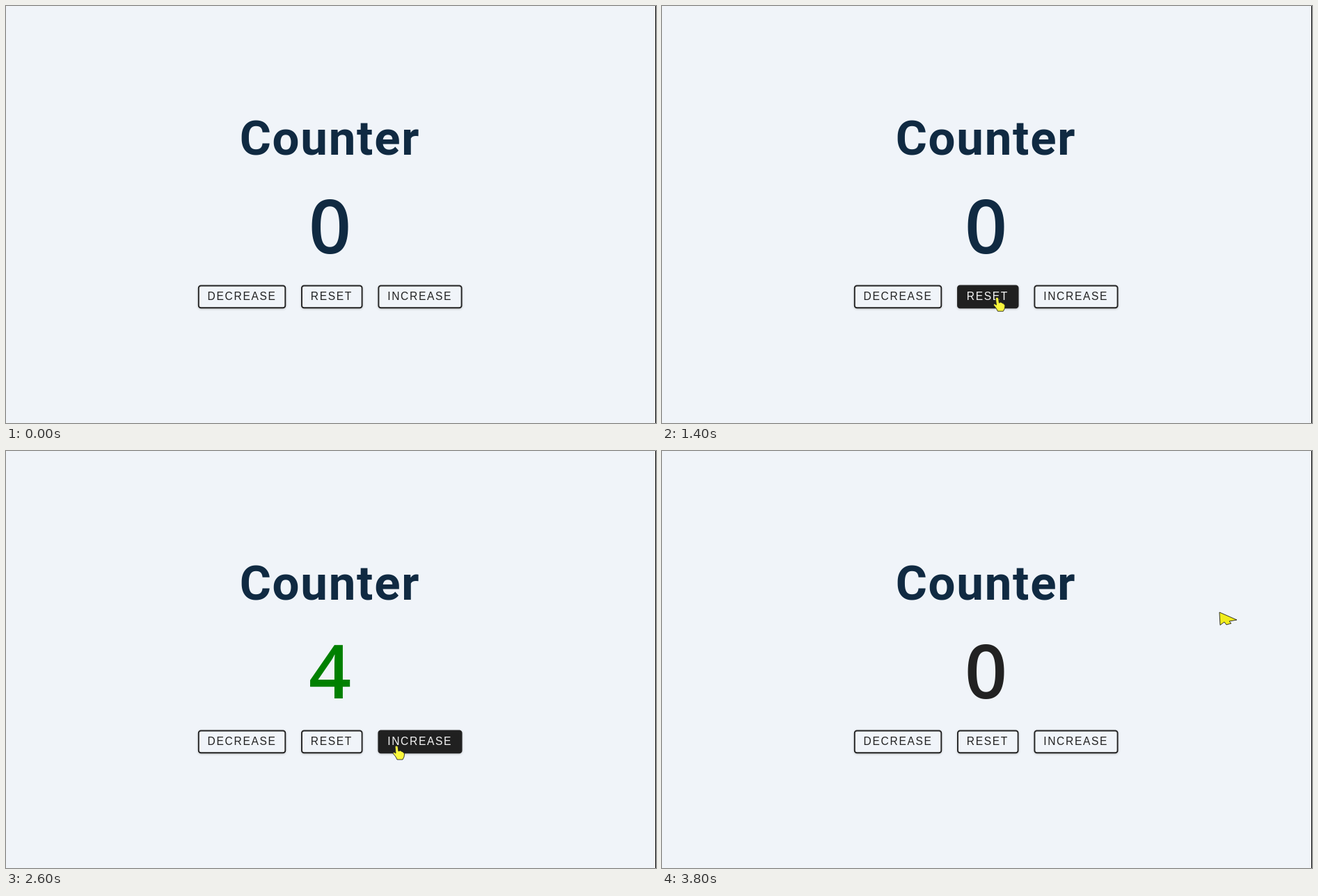
An HTML page that plays this animation: 934 by 600 pixels, repeating every 3900 ms.

```html
<!DOCTYPE html>
<html lang="en">
<head>
<meta charset="utf-8">
<title>Counter</title>
<style>
  html, body { margin: 0; width: 100%; height: 100%; overflow: hidden; background: #f0f4f9; }
  svg { display: block; width: 934px; height: 600px; }
  .title { font: 700 69px Roboto, sans-serif; letter-spacing: 1.73px; fill: #102a42; }
  .value { font: 600 107px "Open Sans", sans-serif; }
  .btn rect { stroke: #222; stroke-width: 1.9; filter: drop-shadow(0 1px 1.5px rgba(0, 0, 0, .2)); }
  .btn text { font: 15.6px "Liberation Sans", Arial, sans-serif; letter-spacing: 1.65px; }
  .cursor path { stroke: #222; stroke-width: .9; stroke-linejoin: round; }
</style>
</head>
<body>
<svg viewBox="0 0 934 600">
  <rect width="934" height="600" fill="#f0f4f9"/>
  <text class="title" x="465.4" y="214" text-anchor="middle">Counter</text>
  <text class="value" x="465.6" y="356" text-anchor="middle"></text>
  <g id="buttons"></g>
  <rect x="933" width="1" height="600" fill="#000"/>
  <g class="cursor"><path/></g>
</svg>
<script>
const LOOP = 3900, STEP = 100;
const ENTER = 300, RESET = 3400, LEAVE = 3700;
const TOP = 401.5, HEIGHT = 33.8;
const EDGE = 8; // the hover reacts a little inside the border

const shapes = {
  hand: ['M-2 1Q0-1 2 1L3 8L5 7Q7 7 7.5 8.5Q9.5 8 10 10Q11.5 10 11.5 12L11 16L9 20H1L-1 16L-5 11Q-5 9-3 9.5L-1 11Z', '#fbf83c'],
  arrow: ['M0 0V14L3.5 11L6 17L8.5 16L6 10.5H11Z', '#ffee58'],
  swept: ['M0 0L25 11L14 13L17 16L10 18L7 14L1 18.5Z', '#f0ec1c']
};

// the pointer rests between moves
const home = { x: 630, y: 413 };
const moves = [
  { from: ENTER, to: 1000, x: 362, y: 412 },
  { from: 1100, to: 1600, x: 561, y: 424 },
  { from: 2700, to: 2800, x: 345, y: 424 },
  { from: 3000, to: 3100, x: 431, y: 426 },
  { from: 3100, to: 3300, x: 446, y: 416 },
  { from: RESET, to: 3800, x: 801, y: 232 }
];

const NS = 'http://www.w3.org/2000/svg';
const $ = s => document.querySelector(s);
const clamp = (v, lo, hi) => Math.min(hi, Math.max(lo, v));
const lerp = (a, b, k) => a + (b - a) * k;
const mix = (a, b, k) => `rgb(${a.map((v, i) => Math.round(lerp(v, b[i], k)))})`;
const value = $('.value'), cursor = $('.cursor'), outline = $('.cursor path');

function add(parent, tag, attrs) {
  const el = document.createElementNS(NS, tag);
  for (const k in attrs) el.setAttribute(k, attrs[k]);
  return parent.appendChild(el);
}

function makeButton(label, x, w) {
  const g = add($('#buttons'), 'g', { class: 'btn' });
  const box = add(g, 'rect', { x: x + 1, y: TOP + 1, width: w - 2, height: HEIGHT - 2, rx: 3.3 });
  const text = add(g, 'text', { x: x + 13.8, y: 423 });
  text.textContent = label;
  return { x, w, box, text };
}

const buttons = [
  makeButton('DECREASE', 275.8, 126.5),
  makeButton('RESET', 424, 88.6),
  makeButton('INCREASE', 534.4, 121.2)
];

function pointer(t) {
  if (t < ENTER) return null;
  return moves.reduce((p, m) => {
    const k = clamp((t - m.from) / (m.to - m.from), 0, 1);
    return { x: lerp(p.x, m.x, k), y: lerp(p.y, m.y, k) };
  }, home);
}

// steady clicks up, then quick clicks down until the reset
function count(t) {
  if (t >= RESET) return 0;
  const up = clamp(Math.floor((t - 1680) / 220), 0, 4);
  const down = clamp(Math.ceil((t - 2700) / 40), 0, 10);
  return up - down;
}

function countColor(n, t) {
  if (n) return n > 0 ? '#008000' : '#ff0000';
  return t < RESET ? '#102a42' : '#222';
}

function over(b, t) {
  const p = pointer(t);
  return !!p && Math.abs(p.x - b.x - b.w / 2) < b.w / 2 - EDGE && p.y > TOP && p.y < TOP + HEIGHT;
}

function hover(b, t) {
  const before = over(b, t - STEP);
  return over(b, t) ? (before ? 1 : 0.5) : (before ? 0.95 : 0);
}

function draw(time) {
  const t = Math.floor((time % LOOP) / STEP) * STEP;

  const n = count(t);
  value.textContent = n;
  value.setAttribute('fill', countColor(n, t));

  for (const b of buttons) {
    const k = hover(b, t);
    b.box.setAttribute('fill', mix([240, 244, 249], [32, 32, 32], k));
    b.text.setAttribute('fill', mix([34, 34, 34], [244, 244, 244], k));
  }

  const p = pointer(t);
  cursor.setAttribute('visibility', p ? 'visible' : 'hidden');
  if (!p) return;
  const kind = t >= LEAVE ? 'swept' : buttons.some(b => over(b, t)) ? 'hand' : 'arrow';
  const [d, fill] = shapes[kind];
  outline.setAttribute('d', d);
  outline.setAttribute('fill', fill);
  cursor.setAttribute('transform', `translate(${p.x} ${p.y})`);
}

const start = performance.now();
function tick() {
  draw(performance.now() - start);
  requestAnimationFrame(tick);
}
tick();
</script>
</body>
</html>
```
